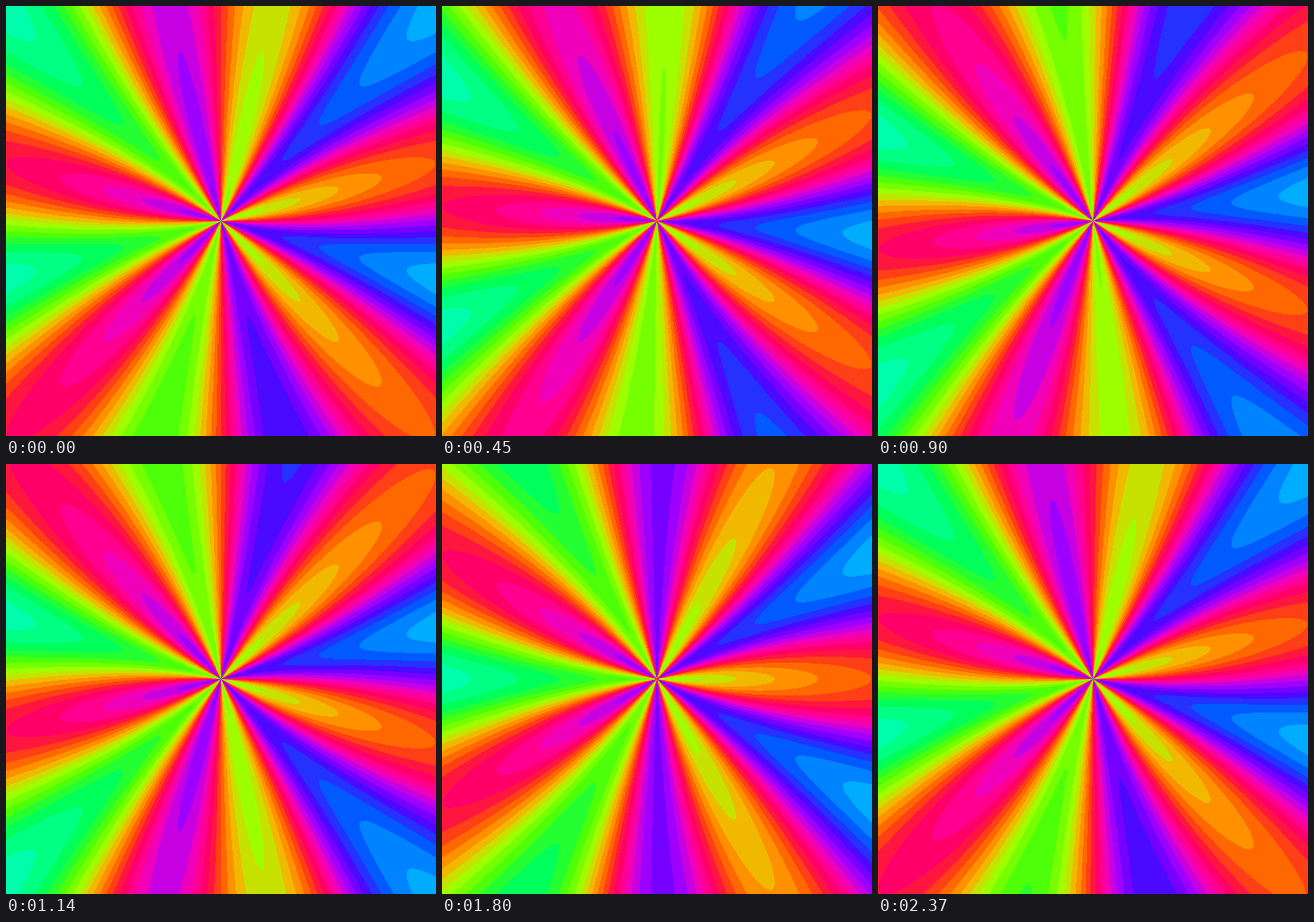
These frames come from a looping animation (500 by 500 pixels, 2400 ms). An HTML page with a canvas:

```html
<!DOCTYPE html>
<html lang="en">
<head>
<meta charset="utf-8">
<title>Rainbow rays</title>
<style>
  html, body { margin: 0; width: 100%; height: 100%; overflow: hidden; }
  canvas { display: block; width: 100vw; height: 100vh; }
</style>
</head>
<body>
<canvas id="stage" width="500" height="500"></canvas>
<script>
const SIZE = 500, HALF = SIZE / 2;
const LOOP = 2400, STEP = 30;
const LEVELS = 25, RAYS = 6;

const ctx = document.getElementById('stage').getContext('2d');
const image = ctx.createImageData(SIZE, SIZE);
const pixels = new Uint32Array(image.data.buffer);

// One colour channel: a clipped triangle around its own hue
function channel(hue, center) {
  const d = Math.abs(hue - center) % 1;
  const v = 1.5 - 4 * Math.min(d, 1 - d);
  return Math.round(255 * Math.max(0, Math.min(1, v)));
}

const palette = Uint32Array.from({ length: LEVELS }, (_, i) => {
  const hue = (i + 0.5) / LEVELS;
  const [r, g, b] = [0, 1 / 3, 2 / 3].map(c => channel(hue, c));
  return (255 << 24 | b << 16 | g << 8 | r) >>> 0;
});

// Parts of the field that do not change with time
const sines = new Float64Array(SIZE * SIZE);
const cosines = new Float64Array(SIZE * SIZE);
const tilt = new Float64Array(SIZE);
for (let x = 0; x < SIZE; x++) {
  const dx = (x + 0.5 - HALF) / HALF;
  tilt[x] = Math.sin(dx);
  for (let y = 0; y < SIZE; y++) {
    const angle = RAYS * Math.atan2((HALF - y - 0.5) / HALF, dx);
    sines[y * SIZE + x] = Math.sin(angle);
    cosines[y * SIZE + x] = Math.cos(angle);
  }
}

function draw(step) {
  const phase = 2 * Math.PI * step * STEP / LOOP;
  const c = Math.cos(phase), s = Math.sin(phase);
  for (let y = 0, i = 0; y < SIZE; y++) {
    for (let x = 0; x < SIZE; x++, i++) {
      const wave = sines[i] * c - cosines[i] * s;
      const level = Math.floor(LEVELS * (1 + (wave - tilt[x]) / 4));
      pixels[i] = palette[level % LEVELS];
    }
  }
  ctx.putImageData(image, 0, 0);
}

const start = performance.now();
let shown = -1;
function tick() {
  const t = Math.max(0, performance.now() - start) % LOOP;
  const step = Math.floor(t / STEP);
  if (step !== shown) draw(shown = step);
  requestAnimationFrame(tick);
}
tick();
</script>
</body>
</html>
```
